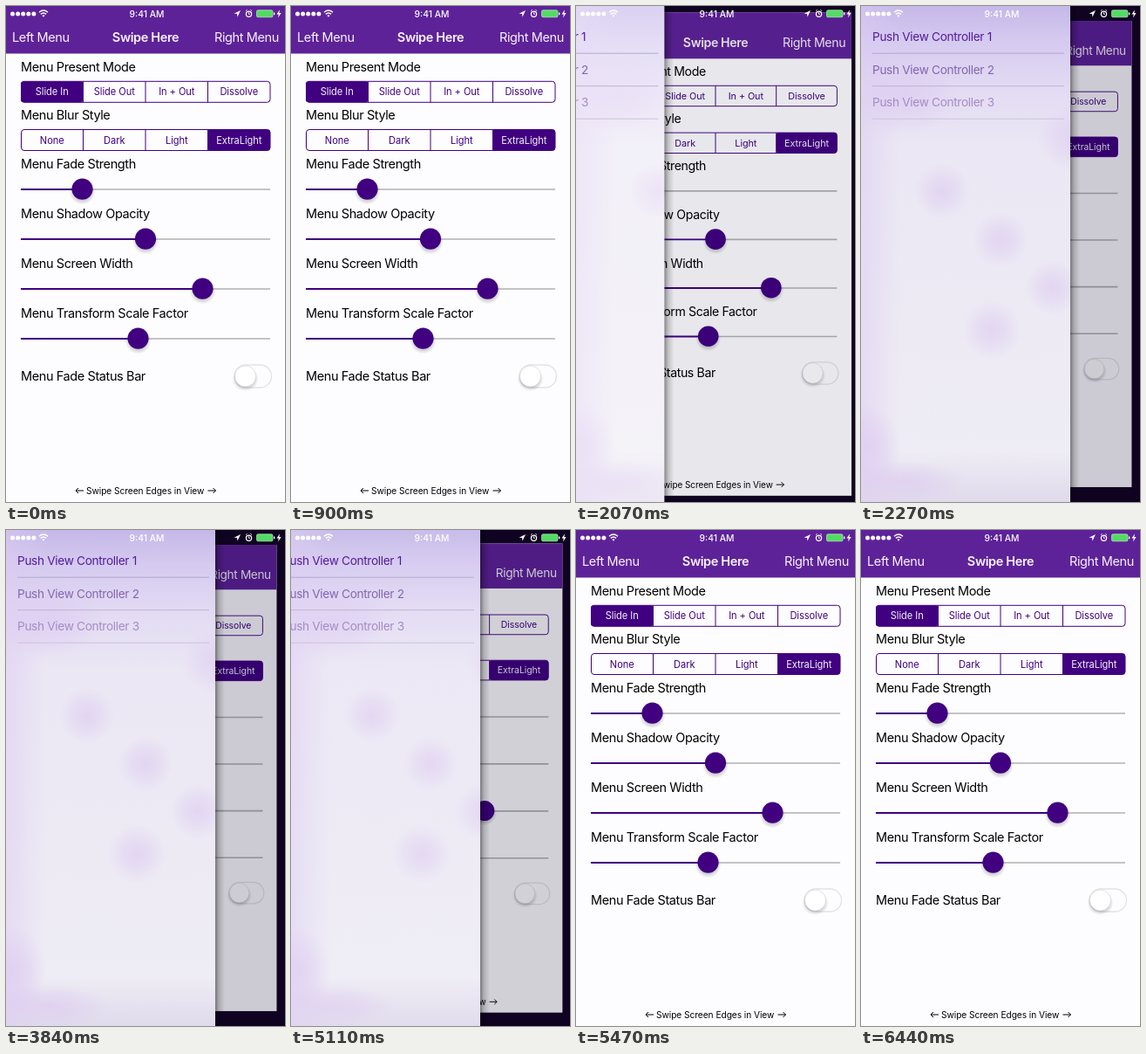
Write an HTML page that moves like this. It is 320 px wide and 568 px high and loops after 6470 ms.

```html
<!DOCTYPE html>
<html lang="en">
<head>
<meta charset="utf-8">
<title>Side menu</title>
<style>
  html, body { margin: 0; width: 100%; height: 100%; overflow: hidden; background: #100322; }
  svg { display: block; width: 100vw; height: 100vh; }
  text { font-family: Inter, Roboto, sans-serif; white-space: pre; }
  .label { font-size: 14.5px; letter-spacing: -.4px; }
  .nav { font-size: 14.5px; letter-spacing: -.38px; fill: #f8f4fc; }
  .title { font-weight: 600; }
  .segment { font-size: 11.1px; letter-spacing: -.07px; text-anchor: middle; }
  .hint { font-size: 10.2px; letter-spacing: -.06px; }
  .item { font-size: 13.65px; letter-spacing: -.33px; }
  .clock { font-size: 10.3px; font-weight: 500; text-anchor: middle; }
</style>
</head>
<body>
<svg viewBox="0 0 320 568">
  <defs>
    <linearGradient id="frost" x2="0" y2="1">
      <stop offset="0" stop-color="#c5b8e8"/>
      <stop offset=".07" stop-color="#d5caef"/>
      <stop offset=".16" stop-color="#e2daf3"/>
      <stop offset=".28" stop-color="#ebe7f4"/>
      <stop offset=".9" stop-color="#eeecf4"/>
      <stop offset="1" stop-color="#e0daec"/>
    </linearGradient>
    <linearGradient id="edge">
      <stop offset="0" stop-color="#dccbf2" stop-opacity=".5"/>
      <stop offset="1" stop-color="#dccbf2" stop-opacity="0"/>
    </linearGradient>
    <linearGradient id="shade">
      <stop offset="0" stop-opacity=".42"/>
      <stop offset=".4" stop-opacity=".16"/>
      <stop offset="1" stop-opacity="0"/>
    </linearGradient>
    <radialGradient id="blot">
      <stop offset="0" stop-color="#dcc8f0" stop-opacity=".6"/>
      <stop offset=".5" stop-color="#dcc8f0" stop-opacity=".35"/>
      <stop offset="1" stop-color="#dcc8f0" stop-opacity="0"/>
    </radialGradient>
    <radialGradient id="knobShadow">
      <stop offset=".6" stop-opacity=".22"/>
      <stop offset="1" stop-opacity="0"/>
    </radialGradient>
    <clipPath id="panelClip"><rect id="panelArea" width="240" height="568"/></clipPath>
  </defs>

  <rect width="320" height="568" fill="#100322"/>
  <g id="main">
    <rect width="320" height="568" fill="#fdfdff"/>
    <rect width="320" height="54.5" fill="#5e2298"/>
    <text class="nav" x="7" y="41">Left Menu</text>
    <text class="nav title" x="160" y="41" text-anchor="middle">Swipe Here</text>
    <text class="nav" x="313" y="41" text-anchor="end">Right Menu</text>
    <g id="controls"></g>
    <rect x="262" y="411" width="42.5" height="26" rx="13" fill="none" stroke="#e3e2e8" stroke-width="1.300"/>
    <ellipse cx="274.500" cy="427" rx="15" ry="14" fill="url(#knobShadow)"/>
    <circle cx="274.500" cy="424" r="12" fill="#fff" stroke="#c9c7d0" stroke-width=".5"/>
    <text class="hint" x="92" y="558.5">Swipe Screen Edges in View</text>
    <path d="M89 555H80m3-3-3 3 3 3M231.500 555h9m-3-3 3 3-3 3" fill="none" stroke="#000"/>
    <rect id="dim" width="320" height="568" fill="#060024"/>
  </g>

  <g id="menu">
    <g clip-path="url(#panelClip)">
      <rect width="240" height="568" fill="url(#frost)"/>
      <rect width="45" height="568" fill="url(#edge)"/>
      <g id="blots"></g>
      <rect id="lighten" width="240" height="568" fill="#fff"/>
    </g>
    <g id="sheet">
      <rect x="240" width="11" height="568" fill="url(#shade)"/>
      <g id="items"></g>
    </g>
  </g>

  <g fill="#fff">
    <g id="signal"></g>
    <g fill="none" stroke="#fff" stroke-width="1.4">
      <path d="M38 7.300q5-4.400 10 0M39.900 9.400q3.100-2.700 6.200 0"/>
      <circle cx="278.500" cy="9.200" r="3.100" stroke-width="1.200"/>
      <path d="M278.500 7.300v2h1.500M275 5.600l1.600-1.300M282 5.600l-1.600-1.300" stroke-width=".9"/>
    </g>
    <path d="M41.400 10.800q1.600-1.200 3.200 0L43 12.700Z"/>
    <text class="clock" x="161.500" y="12.500">9:41 AM</text>
    <path d="M261.500 8.800 269 5l-3.500 7.600-.5-3.500Z"/>
    <rect x="287.500" y="4.800" width="18.500" height="8" rx="1.500" fill="#52dc62" stroke="#d8f5dc" stroke-width=".6"/>
    <rect x="307" y="7.300" width="1.300" height="3" rx=".6"/>
    <path d="M314 4.200 310.500 9.500h2.300l-.8 4 3.600-5.500h-2.300Z"/>
  </g>
</svg>

<script>
const $ = id => document.getElementById(id);
const PURPLE = '#400080';

const label = (text, y) => `<text class="label" x="17" y="${y}">${text}</text>`;

function segments(names, selected, y) {
  const width = 71.5;
  const cells = names.map((name, i) => {
    const x = 17 + i * width;
    const divider = i ? `<path d="M${x} ${y}v24" stroke="${PURPLE}"/>` : '';
    return divider + `<text class="segment" x="${x + width / 2}" y="${y + 16}"
      fill="${i === selected ? '#f6f2fb' : PURPLE}">${name}</text>`;
  });
  return `<rect x="${17 + selected * width}" y="${y}" width="${width}" height="24" rx="3" fill="${PURPLE}"/>
    <rect x="17.500" y="${y}" width="285.500" height="24" rx="3.500" fill="none" stroke="${PURPLE}"/>` + cells.join('');
}

const slider = (x, y) => `
  <path d="M${x} ${y}H303" stroke="#b2b2b4" stroke-width="1.700"/>
  <path d="M17 ${y}H${x}" stroke="${PURPLE}" stroke-width="1.900"/>
  <circle cx="${x}" cy="${y + 2.5}" r="15" fill="url(#knobShadow)"/>
  <circle cx="${x}" cy="${y - .3}" r="12.100" fill="${PURPLE}"/>`;

$('controls').innerHTML =
  label('Menu Present Mode', 75) + segments(['Slide In', 'Slide Out', 'In + Out', 'Dissolve'], 0, 86.3) +
  label('Menu Blur Style', 130) + segments(['None', 'Dark', 'Light', 'ExtraLight'], 3, 141.5) +
  label('Menu Fade Strength', 186) + slider(87.5, 210) +
  label('Menu Shadow Opacity', 243) + slider(160, 267) +
  label('Menu Screen Width', 300) + slider(225.5, 324) +
  label('Menu Transform Scale Factor', 357) + slider(151.5, 381) +
  label('Menu Fade Status Bar', 429);

$('items').innerHTML = [['#541c9c', '#b4a8cc'], ['#8466b0', '#c0b4d2'], ['#a58bc6', '#cfc0dc']]
  .map(([ink, line], i) => {
    const y = 40 + i * 37.5;
    return `<text class="item" x="13" y="${y}" fill="${ink}">Push View Controller ${i + 1}</text>
      <path d="M13 ${y + 14.2}H233" stroke="${line}"/>`;
  }).join('');

const blot = (x, y, rx, ry = rx) => `<ellipse cx="${x}" cy="${y}" rx="${rx}" ry="${ry}" fill="url(#blot)"/>`;
$('blots').innerHTML = blot(93, 212, 32) + blot(160, 268, 32) + blot(220, 322, 32) + blot(150, 371, 34) +
  blot(50, 102, 62, 45) + blot(246, 152, 45, 38) + blot(8, 505, 38, 50) + blot(50, 545, 70, 25);

$('signal').innerHTML = [0, 1, 2, 3, 4].map(i => `<circle cx="${7.5 + i * 6.1}" cy="9" r="2.500"/>`).join('');

// Equivalent of cubic-bezier(.42, 0, .58, 1)
function easeInOut(t) {
  if (t <= 0) return 0;
  if (t >= 1) return 1;
  let low = 0, high = 1, u;
  for (let i = 0; i < 20; i++) {
    u = (low + high) / 2;
    const x = 1.26 * u * (1 - u) ** 2 + 1.74 * u * u * (1 - u) + u ** 3;
    if (x < t) low = u; else high = u;
  }
  return u * u * (3 - 2 * u);
}

const LOOP = 6470, DURATION = 310, OPEN_AT = 1930, CLOSE_AT = 5044;

function draw(time) {
  const open = easeInOut((time - OPEN_AT) / DURATION) - easeInOut((time - CLOSE_AT) / DURATION);
  const shift = 240 * (open - 1);

  $('main').setAttribute('transform', `translate(160 284) scale(${1 - .06 * open}) translate(-160 -284)`);
  $('dim').setAttribute('opacity', .2 * open);
  $('menu').setAttribute('visibility', open > 0 ? 'visible' : 'hidden');
  $('panelArea').setAttribute('x', shift);
  $('sheet').setAttribute('transform', `translate(${shift})`);
  $('lighten').setAttribute('opacity', .6 * (1 - open));
}

function tick() {
  draw(performance.now() % LOOP);
  requestAnimationFrame(tick);
}
tick();
</script>
</body>
</html>
```
